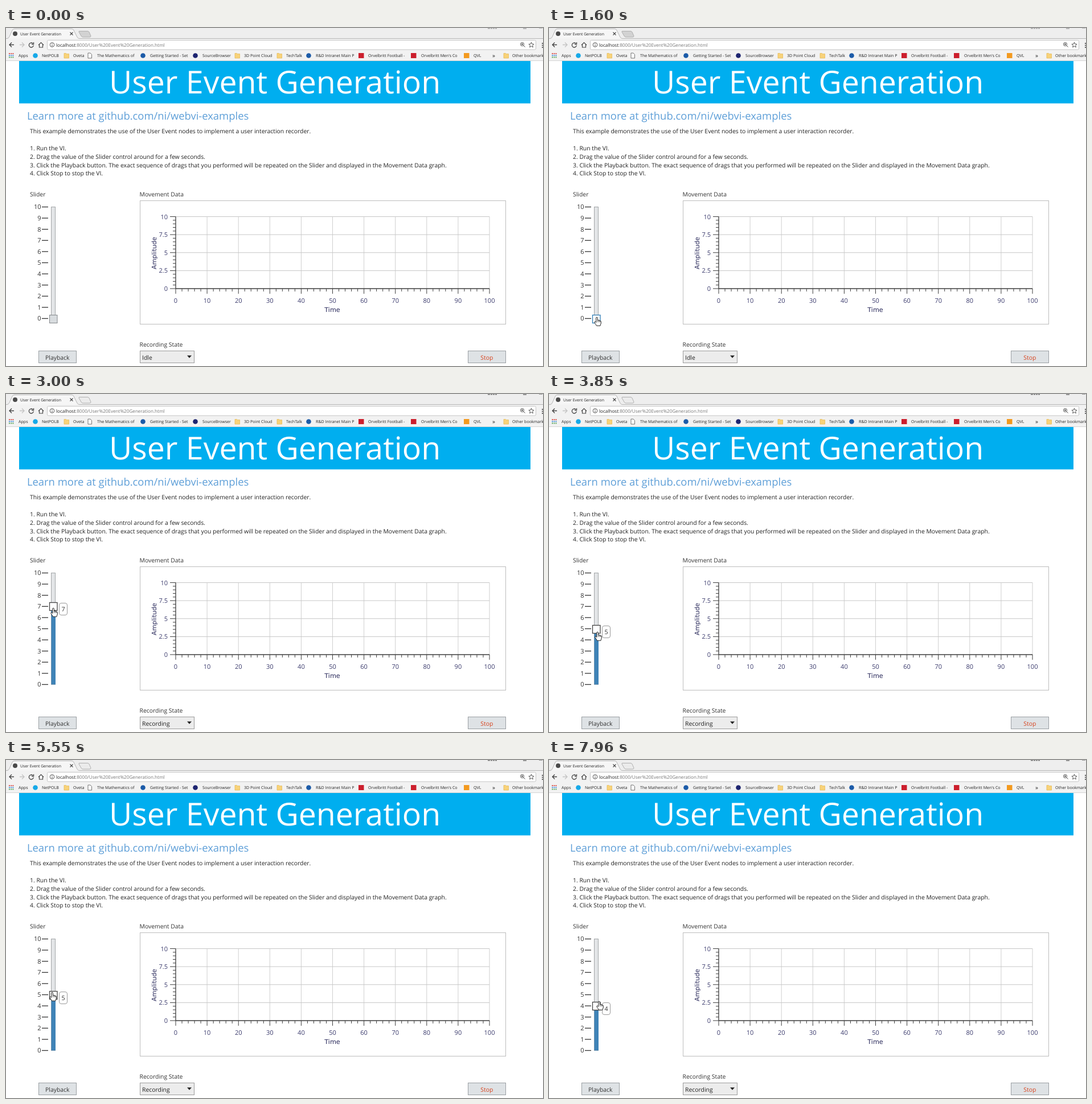
An HTML page that plays this animation: 943x594 px, repeating every 8000 ms.

```html
<!DOCTYPE html>
<html lang="en">
<head>
<meta charset="utf-8">
<title>User Event Generation</title>
<style>
  html, body { margin: 0; width: 100%; height: 100%; overflow: hidden; background: #fff; }
  svg { display: block; width: 943px; height: 594px; }
  text { font-family: "Open Sans", "Noto Sans", sans-serif; text-rendering: geometricPrecision; white-space: pre; }
</style>
</head>
<body>
<svg id="stage" viewBox="0 0 943 594" xmlns="http://www.w3.org/2000/svg"></svg>
<script>
const LOOP = 8000, HOVER = 1050, PRESS = 1830;
const ZERO_Y = 510, UNIT = 19.6;

const rect = (x, y, w, h, fill, stroke = 'none', extra = '') =>
  `<rect x="${x}" y="${y}" width="${w}" height="${h}" fill="${fill}" stroke="${stroke}" ${extra}/>`;
const line = (x1, y1, x2, y2, stroke, width = 1) =>
  `<path d="M${x1} ${y1}L${x2} ${y2}" stroke="${stroke}" stroke-width="${width}"/>`;
const path = (d, stroke, fill = 'none', width = 1) =>
  `<path d="${d}" fill="${fill}" stroke="${stroke}" stroke-width="${width}"/>`;
const circle = (x, y, r, fill, stroke = 'none') =>
  `<circle cx="${x}" cy="${y}" r="${r}" fill="${fill}" stroke="${stroke}"/>`;
const text = (x, y, size, str, fill = '#222', extra = '') =>
  `<text x="${x}" y="${y}" font-size="${size}" fill="${fill}" ${extra}>${str}</text>`;
const END = 'text-anchor="end"', MID = 'text-anchor="middle"';
const range = (n, fn) => Array.from({ length: n }, (_, i) => fn(i)).join('');

function browser() {
  const folder = x => path(`M${x} 44.5h3.5l1 1h4v7.5h-8.5z`, '#e3b850', '#f8d27a', .7);
  const dot = color => x => circle(x + 4.5, 48.5, 4.3, color);
  const square = color => x => rect(x, 44, 9.5, 9, color);
  const sheet = x => path(`M${x + 1} 44h4l2.5 2.5v6.500h-6.500z`, '#666', '#fff', .9);
  const bookmarks = [
    [47, 63, 'NetPOLB', dot('#16a9e8')], [102, 118, 'Oveta', folder],
    [143, 160, 'The Mathematics of', sheet], [236, 253, 'Getting Started - Set', dot('#1c5ba8')],
    [328, 345, 'SourceBrowser', dot('#1d2470')], [402, 418, '3D Point Cloud', folder],
    [476, 492, 'TechTalk', folder], [527, 544, 'R&amp;D Intranet Main P', dot('#1c5ba8')],
    [619, 636, 'Orvelbritt Football -', square('#cc1f2d')],
    [711, 729, 'Orvelbritt Men\'s Co', square('#cc1f2d')],
    [804, 821, 'QVL', square('#f39a1f')], [874, 889, 'Other bookmarks', folder]
  ];
  const apps = ['#d9534f', '#4a90d9', '#5aa65a'];
  return rect(0, 0, 943, 57.5, '#f2f2f2') + rect(0, 0, 943, 18, '#eeeeee') +
    path('M0 18.500H2Q5 18 6 15L11 4Q12 1.500 15 1.500H115Q118 1.500 119 4L125 16Q126 18.500 129 18.500H943', '#b5b5b5', '#f6f6f6') +
    path('M129 5.500H143Q145 5.500 146 7L149 14Q149 16 147 16H135Q133 16 132 14L128 7Q127.500 5.500 129 5.500Z', '#b0b0b0', '#d2d2d2').replace('<path', '<path id="newTab"') +
    circle(16, 10, 4, '#4a4a4a') + text(25, 12.5, 6.85, 'User Event Generation') +
    path('M112.500 7.500l5 5m0-5l-5 5', '#444', 'none', 1.1) +
    `<g id="caption">${path('M846 .8h4m1 0h3m1 0h3m1 0h3M908 1h6', '#777', 'none', 1.6)}${path('M936 .5h6', '#999')}</g>` +
    path('M14 29.500H6m4-4l-4 4l4 4', '#444', 'none', 1.3) +
    path('M24 29.500h8m-4-4l4 4l-4 4', '#c4c4c4', 'none', 1.3) +
    path('M47 27a4 4 0 1 0 1.300 3.500M48.500 25v3.500h-3.500', '#444', 'none', 1.3) +
    path('M57 30l4.500-4.500l4.500 4.500M58.500 29v5h6v-5', '#444', 'none', 1.2) +
    rect(72.5, 21.5, 858, 16.5, '#fff', '#c6c6c6', 'rx="2"') +
    circle(81, 29.5, 3.8, 'none', '#555') + path('M81 29v3m0-5v1', '#555') +
    text(88, 32.7, 8.14, 'localhost<tspan fill="#777">:8000/User%20Event%20Generation.html</tspan>') +
    circle(906.5, 28.5, 3, 'none', '#444') + path('M909 31l2.500 2.500M905 28.500h3m-1.500-1.500v3', '#444') +
    path('M922.500 25l1.300 3.100l3.300.300l-2.500 2.200l.800 3.200l-2.900-1.700l-2.900 1.700l.800-3.200l-2.500-2.200l3.300-.300z', '#444', 'none', .9) +
    path('M942 26v2m0 1.500v2m0 1.500v2', '#444', 'none', 1.6) +
    range(9, i => rect(5 + i % 3 * 3.2, 44 + Math.floor(i / 3) * 3.2, 2, 2, apps[Math.floor(i / 3)])) +
    text(22, 51.2, 7.1, 'Apps') +
    bookmarks.map(([ix, tx, name, icon]) => icon(ix) + text(tx, 51.2, 7.1, name)).join('') +
    text(854, 51.5, 10, '»') + line(0, 57.5, 943, 57.5, '#d5d5d5');
}

function intro() {
  const steps = [
    '1. Run the VI.',
    '2. Drag the value of the Slider control around for a few seconds.',
    '3. Click the Playback button. The exact sequence of drags that you performed will be repeated on the Slider and displayed in the Movement Data graph.',
    '4. Click Stop to stop the VI.'
  ];
  return rect(23, 58, 898, 74.5, '#00aeef') +
    text(181, 115, 55.4, 'User Event Generation', '#fff') +
    text(37, 161, 18.4, 'Learn more at github.com/ni/webvi-examples', '#5e9fd8') +
    text(42, 185.3, 10.4, 'This example demonstrates the use of the User Event nodes to implement a user interaction recorder.') +
    steps.map((s, i) => text(42, 215 + i * 14.8, 10.4, s)).join('');
}

function graph() {
  const left = 298, top = 331.5, w = 551, h = 126.5, base = top + h;
  const ink = '#3c3c3c', label = '#3b3b6d', dejavu = 'style="font-family:\'DejaVu Sans\',sans-serif"';
  const px = v => left + v * w / 100, py = v => base - v * h / 10;
  return text(234.5, 296.3, 10.4, 'Movement Data', '#333') +
    rect(235.5, 303.5, 642, 217, '#fff', '#bdbdbd') +
    range(10, i => line(px(i * 10 + 10), top, px(i * 10 + 10), base, '#cfcfcf')) +
    range(4, i => line(left, py(i * 2.5 + 2.5), px(100), py(i * 2.5 + 2.5), '#c6c6c6')) +
    range(51, i => line(px(i * 2), base, px(i * 2), base + (i % 5 ? 5 : 9), ink)) +
    range(21, i => line(left - (i % 5 ? 5 : 10), py(i / 2), left, py(i / 2), ink)) +
    line(left, top, left, base, ink, 1.3) + line(left, base, px(100), base, ink, 1.3) +
    range(11, i => text(px(i * 10), 483, 11, i * 10, label, MID)) +
    range(5, i => text(284, py(i * 2.5) + 4, 11, i * 2.5, label, END)) +
    text(573, 498.5, 11.2, 'Time', '#2b2b5c', MID + dejavu) +
    text(0, 0, 11.1, 'Amplitude', '#2b2b5c', `${MID} ${dejavu} transform="translate(264 395.500) rotate(-90)"`);
}

function controls() {
  const button = (x, name, color) =>
    rect(x + .5, 567.5, 66, 21, '#dee2e5', '#9a9fa3') + text(x + 33.3, 582.7, 10.4, name, color, MID);
  return text(42, 296.3, 10.4, 'Slider', '#333') +
    range(11, v => text(61.5, ZERO_Y - v * UNIT + 4.3, 11, v, '#333', END) +
      line(63, ZERO_Y + .5 - v * UNIT, 74, ZERO_Y + .5 - v * UNIT, '#333', 1.3)) +
    rect(79.5, 314.5, 7, 196, '#e3e5e7', '#a3a6a8') +
    rect(79.5, 0, 7.5, 0, '#3f83b7', 'none', 'id="fill"') +
    rect(76.5, 503.5, 13.5, 14, '#d8dcdf', '#85898c', 'id="thumb"') +
    `<g id="tip">${rect(93.5, -5.5, 14, 21, '#fff', '#999', 'rx="3.500"')}${text(100.5, 9.2, 10.8, '', '#333', MID + ' id="tipValue"')}</g>` +
    text(234.5, 560, 10.4, 'Recording State', '#333') +
    rect(235.5, 567.5, 95, 21, '#ececec', '#9c9c9c') +
    text(239, 582.7, 10.4, 'Idle', '#222', 'id="state"') +
    path('M318 575.500h8l-4 4.500z', 'none', '#222') +
    button(57, 'Playback', '#333') + button(811, 'Stop', '#d8421c');
}

const pointers =
  '<g id="arrow">' + path('M0 0V15L3.500 11.800L6 17.500L8.300 16.500L5.900 11H10.800Z', '#222', '#fff', .9) + '</g>' +
  '<g id="hand">' + path('M-1.300 8V1Q0 -1 1.300 1V5.500L3.300 5.300L3.500 6L5.300 5.900L5.600 6.700Q7.300 6.500 7.300 8V11Q6.500 13 6 15.300H-.5Q-2 12.500-4.200 9.500Q-4.500 7.500-2.600 8.200L-1.300 9.500Z', '#222', '#fff', 1) +
  path('M1.300 5.500V9M3.500 6v3M5.500 6.500v2.500', '#222', 'none', .7) + '</g>';

document.getElementById('stage').innerHTML =
  rect(0, 0, 943, 594, '#fff') + browser() + intro() + graph() + controls() + pointers;
const el = id => document.getElementById(id);
const set = (id, attrs) => Object.entries(attrs).forEach(([k, v]) => el(id).setAttribute(k, v));

// Pointer tip: time, x, y
const moves = [
  [180, 829, 584], [340, 700, 440], [520, 470, 379], [740, 240, 420], [900, 110, 494],
  [980, 82, 512], [1190, 84, 508], [1830, 84, 508], [2000, 84, 504], [2150, 84, 490],
  [2220, 83, 474], [2300, 82, 457], [2380, 82, 455], [3000, 83, 376], [3230, 83, 376],
  [3850, 85, 418], [3920, 85, 419], [4010, 84, 427], [4860, 83, 479], [5010, 83, 488],
  [5240, 82, 488], [5550, 81, 408], [5630, 81, 405], [6010, 84, 340], [6090, 84, 340],
  [6240, 90, 338], [7020, 90, 338], [7810, 88, 412], [7890, 88, 418], [7960, 88, 424]
];

function pointerAt(t) {
  const i = moves.findIndex(m => m[0] > t);
  if (i < 0) return moves.at(-1).slice(1);
  if (i === 0) return moves[0].slice(1);
  const [t0, x0, y0] = moves[i - 1], [t1, x1, y1] = moves[i];
  const k = (t - t0) / (t1 - t0);
  return [x0 + (x1 - x0) * k, y0 + (y1 - y0) * k];
}

function render(t) {
  const [x, y] = pointerAt(t);
  const hover = t >= HOVER, drag = t >= PRESS;
  const value = drag ? Math.max(0, Math.round((ZERO_Y + .5 - y) / UNIT)) : 0;
  const thumbY = Math.round(ZERO_Y + .5 - value * UNIT);

  const at = `translate(${x} ${y})`;
  set('arrow', { transform: at, visibility: t >= 180 && !hover ? 'visible' : 'hidden' });
  set('hand', { transform: at, visibility: hover ? 'visible' : 'hidden' });
  set('thumb', {
    y: thumbY - 6.5,
    fill: hover ? '#fff' : '#d8dcdf',
    stroke: drag ? '#444' : hover ? '#2f7db5' : '#85898c',
    'stroke-width': hover ? 1.3 : 1
  });
  set('fill', { y: thumbY, height: value ? 510.5 - thumbY : 0 });
  set('tip', { transform: `translate(0 ${thumbY})`, visibility: drag ? 'visible' : 'hidden' });
  el('tipValue').textContent = value;
  el('state').textContent = value ? 'Recording' : 'Idle';
  set('newTab', { fill: drag ? '#ebebeb' : '#d2d2d2' });
  set('caption', { opacity: drag ? 1 : .6 });
}

const start = performance.now();
function tick() {
  render((performance.now() - start) % LOOP);
  requestAnimationFrame(tick);
}
tick();
</script>
</body>
</html>
```
